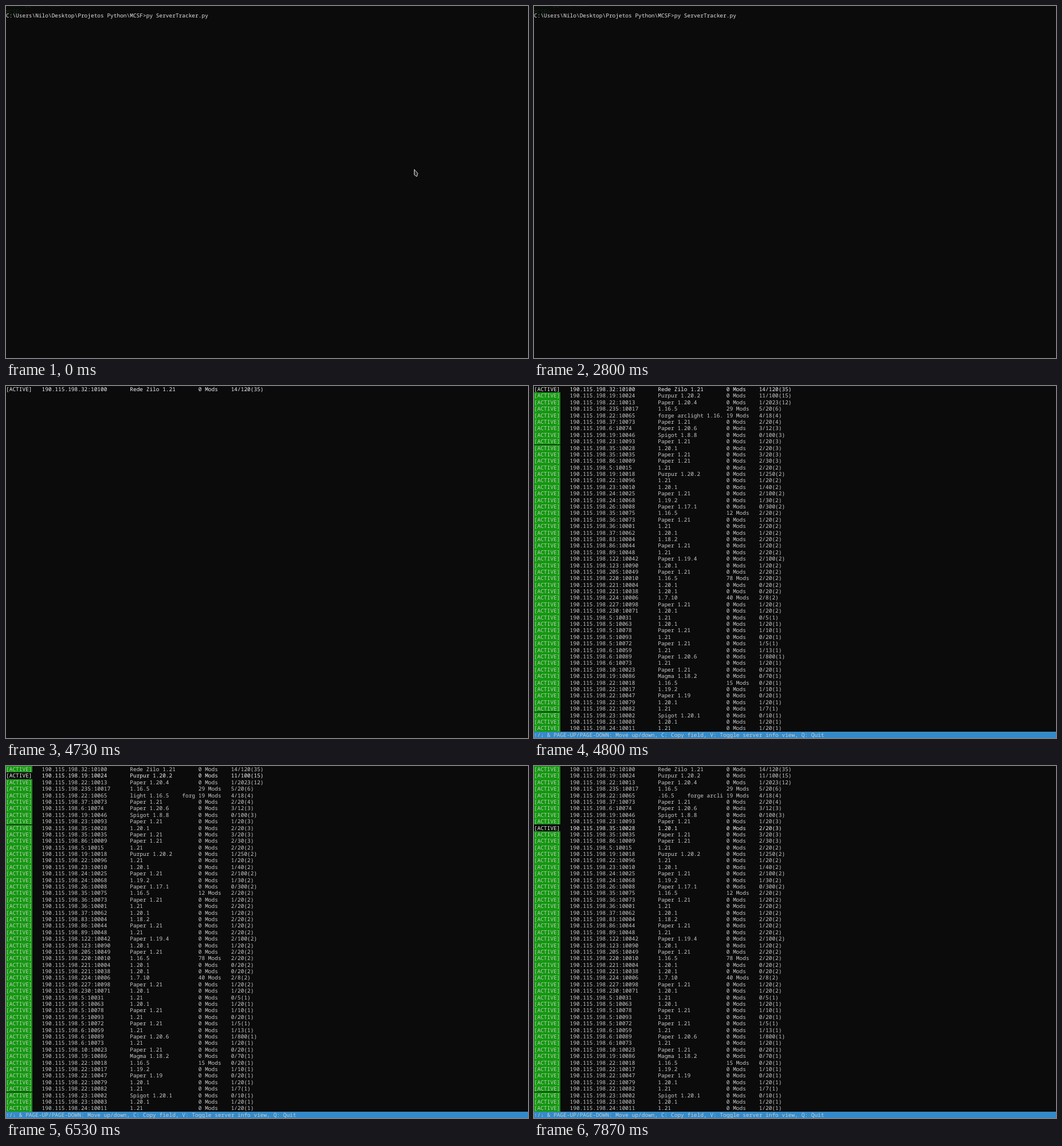
Write an HTML page that moves like this. It is 911 px wide and 615 px high and loops after 8000 ms.

```html
<!DOCTYPE html>
<html lang="en">
<head>
<meta charset="utf-8">
<title>Server tracker</title>
<style>
html, body { margin: 0; width: 100%; height: 100%; overflow: hidden; background: #0b0b0b; }
#stage {
  --row: 11.39px; --col: 5.694px;
  position: relative; width: 911px; height: 615px; overflow: hidden; color: #ccc;
  font: 9.49px/var(--row) "Noto Sans Mono", "DejaVu Sans Mono", monospace;
  font-variant-ligatures: none; text-rendering: geometricPrecision; white-space: pre;
}
#stage div { position: absolute; left: 0; top: 0; }
#stage .row { top: calc(var(--n) * var(--row)); height: var(--row); }
.row b { font-weight: 400; display: inline-block; height: var(--row); vertical-align: top; background: #13980f; }
.sel { color: #f4f4f4; }
.sel b { background: none; }
#stage .ghost { color: #0d2b11; }
#caret { width: var(--col); height: 2px; background: #ccc; }
#stage #bar { top: calc(53 * var(--row)); width: 100%; height: 11.4px; background: #348ac9; }
svg { position: absolute; left: 0; top: 0; }
.off { visibility: hidden; }
</style>
</head>
<body>
<div id="stage">
  <div id="shell">
    <div class="ghost" style="top:-8px">\MCSF\python main</div>
    <div class="ghost" style="top:4.4px">MCSF&gt;</div>
    <div class="row" style="--n:1;color:#e4e4e4">C:\Users\Nilo\Desktop\Projetos Python\MCSF&gt;py ServerTracker.py</div>
    <div id="caret"></div>
    <svg width="911" height="615"><polygon id="pointer" points="712.5,285.5 712.5,295 717,298 718.7,292.3" fill="#333" stroke="#ddd"/></svg>
  </div>
  <div id="list"></div>
  <div id="bar">↑/↓ &amp; PAGE-UP/PAGE-DOWN: Move up/down, C: Copy field, V: Toggle server info view, Q: Quit</div>
</div>
<script>
// host:port | version | players | mods (none when left out)
const servers = `32:10100|Rede Zilo 1.21|14/120(35)
19:10024|Purpur 1.20.2|11/100(15)
22:10013|Paper 1.20.4|1/2023(12)
235:10017|1.16.5|5/20(6)|29
22:10065|forge arclight 1.16.5|4/18(4)|19
37:10073|Paper 1.21|2/20(4)
6:10074|Paper 1.20.6|3/12(3)
19:10046|Spigot 1.8.8|0/100(3)
23:10093|Paper 1.21|1/20(3)
35:10028|1.20.1|2/20(3)
35:10035|Paper 1.21|3/20(3)
86:10009|Paper 1.21|2/30(3)
5:10015|1.21|2/20(2)
19:10018|Purpur 1.20.2|1/250(2)
22:10096|1.21|1/20(2)
23:10010|1.20.1|1/40(2)
24:10025|Paper 1.21|2/100(2)
24:10068|1.19.2|1/30(2)
26:10008|Paper 1.17.1|0/300(2)
35:10075|1.16.5|2/20(2)|12
36:10073|Paper 1.21|1/20(2)
36:10001|1.21|2/20(2)
37:10062|1.20.1|1/20(2)
83:10004|1.18.2|2/20(2)
86:10044|Paper 1.21|1/20(2)
89:10048|1.21|2/20(2)
122:10042|Paper 1.19.4|2/100(2)
123:10090|1.20.1|1/20(2)
205:10049|Paper 1.21|2/20(2)
220:10010|1.16.5|2/20(2)|78
221:10004|1.20.1|0/20(2)
221:10038|1.20.1|0/20(2)
224:10006|1.7.10|2/8(2)|40
227:10098|Paper 1.21|1/20(2)
230:10071|1.20.1|1/20(2)
5:10031|1.21|0/5(1)
5:10063|1.20.1|1/20(1)
5:10078|Paper 1.21|1/10(1)
5:10093|1.21|0/20(1)
5:10072|Paper 1.21|1/5(1)
6:10059|1.21|1/13(1)
6:10089|Paper 1.20.6|1/800(1)
6:10073|1.21|1/20(1)
10:10023|Paper 1.21|0/20(1)
19:10086|Magma 1.18.2|0/70(1)
22:10018|1.16.5|0/20(1)|15
22:10017|1.19.2|1/10(1)
22:10047|Paper 1.19|0/20(1)
22:10079|1.20.1|1/20(1)
22:10082|1.21|1/7(1)
23:10002|Spigot 1.20.1|0/10(1)
23:10003|1.20.1|1/20(1)
24:10011|1.21|1/20(1)`.split('\n').map(line => line.split('|'));

const LOOP = 8000, CLEAR = 4530, FIRST = 4730, FULL = 4800, WIDTH = 20, LONG = 4;
const $ = id => document.getElementById(id);
const show = (el, on) => el.classList.toggle('off', !on);
const passed = (times, t) => times.filter(at => at <= t).length;
// Latest value in [time, value] pairs
const at = (steps, t) => steps.reduce((v, [time, next]) => t >= time ? next : v, 0);

const rows = servers.map(([host, version, players, mods = 0], n) => {
  const row = document.createElement('div');
  row.className = 'row';
  row.style.setProperty('--n', n);
  const name = document.createElement('span');
  name.textContent = version.slice(0, WIDTH).padEnd(WIDTH);
  row.innerHTML = '<b>[ACTIVE]</b>';
  row.append('   ' + ('190.115.198.' + host).padEnd(27), name,
    ' ' + (mods + ' Mods').padEnd(10) + players);
  row.name = name;
  $('list').append(row);
  return row;
});

const blinks = [930, 1470, 2070, 2800, 3330, 3930];
const drift = [[70, -8], [130, -14.5], [1470, -1.5]];
const scrolls = [4930, 5130, 5330, 5470, 5670, 5870, 6070, 6330, 6530,
  6600, 6670, 7270, 7530, 7600, 7730, 7870];
const picks = [[6330, 1], [6670, 2], [6870, 3], [7600, 4], [7870, 9]];
const loopText = servers[LONG][1] + '    ';

function draw(t) {
  const shell = t < CLEAR, pick = at(picks, t), shift = passed(scrolls, t);
  $('shell').style.display = shell ? '' : 'none';
  show($('caret'), passed(blinks, t) % 2);
  const entered = t >= 1130;
  $('caret').style.left = entered ? '0' : 'calc(62 * var(--col))';
  $('caret').style.top = entered ? '31.5px' : '20.5px';
  show($('pointer'), t < 1600);
  $('pointer').setAttribute('transform', `translate(${at(drift, t)})`);
  show($('bar'), t >= FULL);
  rows.forEach((row, n) => {
    show(row, t >= (n ? FULL : FIRST));
    row.classList.toggle('sel', n === pick);
  });
  rows[LONG].name.textContent = (loopText + loopText).slice(shift, shift + WIDTH);
}

const start = performance.now();
function tick() {
  draw((performance.now() - start) % LOOP);
  requestAnimationFrame(tick);
}
tick();
</script>
</body>
</html>
```
